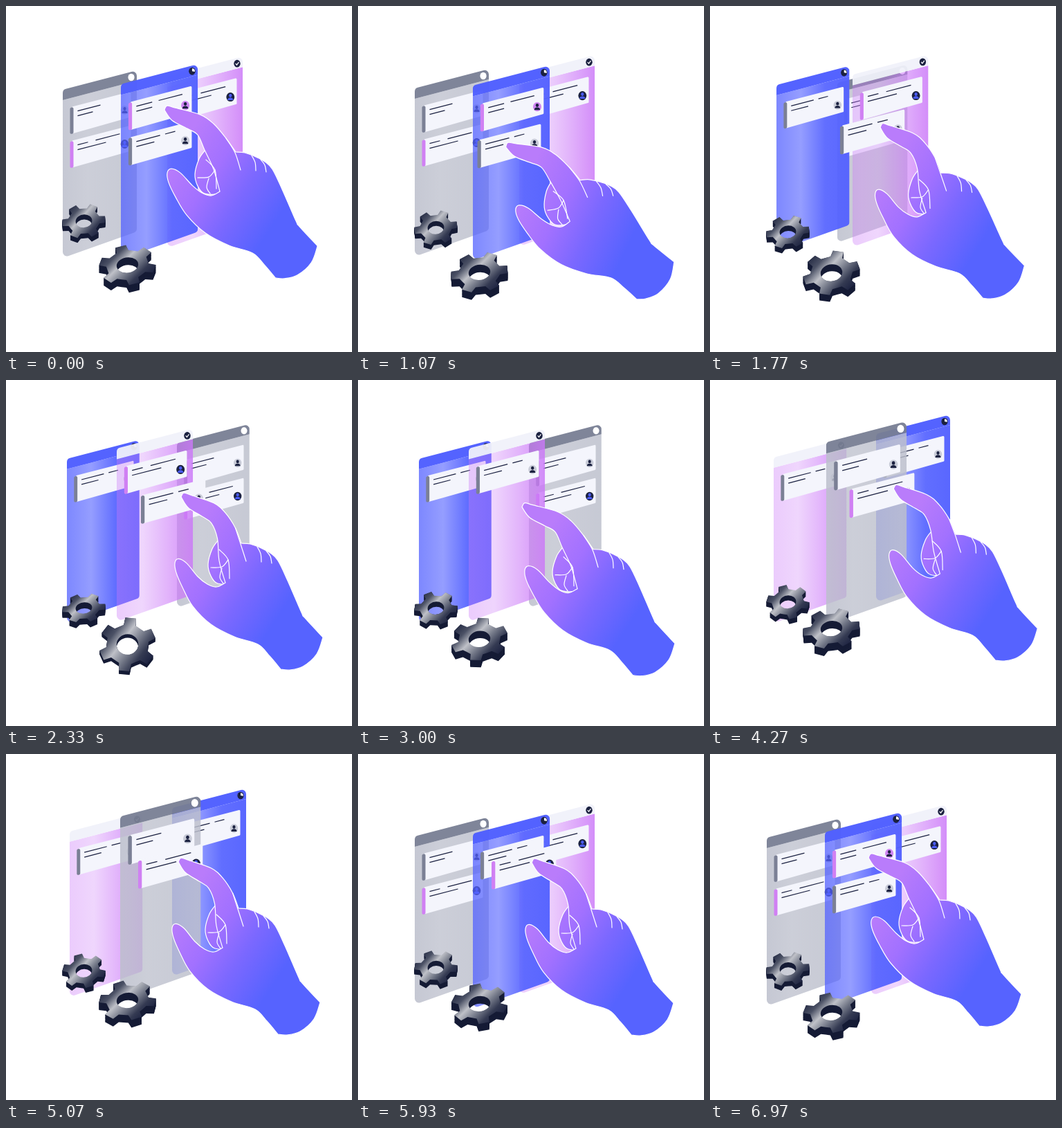
An HTML page with a canvas that plays this animation: 500 by 500 pixels, repeating every 7.01 s.

```html
<!DOCTYPE html>
<html lang="en">
<head>
<meta charset="utf-8">
<title>Task boards</title>
<style>
  html, body { margin: 0; width: 100%; height: 100%; overflow: hidden; background: #fff; }
  canvas { display: block; width: 500px; height: 500px; }
</style>
</head>
<body>
<canvas id="stage"></canvas>
<script>
const LOOP = 7010, SLOPE = -0.26, TAU = Math.PI * 2;
const NAVY = '#1b2140', GRAY = '#7b8095', PINK = '#d080f3';
const canvas = document.getElementById('stage');
const ctx = canvas.getContext('2d');
const ratio = Math.max(1, window.devicePixelRatio || 1);
canvas.width = canvas.height = 500 * ratio;

// Timing helpers
const ease = (t, from, to) => {
  const u = Math.min(1, Math.max(0, (t - from) / (to - from)));
  return u * u * (3 - 2 * u);
};
const mix = (a, b, u) => a.map((v, i) => v + (b[i] - v) * u);
const wave = (t, peak) => Math.cos((t - peak) / LOOP * TAU);
const bump = (t, peak, width) => Math.exp(-(((t - peak) / width) ** 2));

// Drawing helpers
function place(x, y, s, draw) {
  ctx.save();
  ctx.translate(x, y);
  ctx.scale(s, s);
  draw();
  ctx.restore();
}

function roundPoly(pts, r) {
  const n = pts.length, a = pts[n - 1], b = pts[0];
  ctx.beginPath();
  ctx.moveTo((a[0] + b[0]) / 2, (a[1] + b[1]) / 2);
  pts.forEach((p, i) => ctx.arcTo(...p, ...pts[(i + 1) % n], r));
  ctx.closePath();
}

function fillPoly(pts, r, color) {
  roundPoly(pts, r);
  ctx.fillStyle = color;
  ctx.fill();
}

function disc(x, y, rx, ry, color, from = 0, to = TAU) {
  ctx.beginPath();
  ctx.ellipse(x, y, rx, ry, 0, from, to);
  ctx.fillStyle = color;
  ctx.fill();
}

function line(pts, color, width) {
  ctx.beginPath();
  pts.forEach(p => ctx.lineTo(...p));
  ctx.strokeStyle = color;
  ctx.lineWidth = width;
  ctx.stroke();
}

function gradient(box, stops) {
  const g = ctx.createLinearGradient(...box);
  stops.forEach(stop => g.addColorStop(...stop));
  return g;
}

// Smooth curve through the points, continuing the current path.
function trace(pts) {
  ctx.lineTo(...pts[0]);
  for (let i = 0; i < pts.length - 1; i++) {
    const a = pts[i - 1] || pts[i], b = pts[i], c = pts[i + 1], d = pts[i + 2] || c;
    ctx.bezierCurveTo(b[0] + (c[0] - a[0]) / 6, b[1] + (c[1] - a[1]) / 6,
      c[0] - (d[0] - b[0]) / 6, c[1] - (d[1] - b[1]) / 6, ...c);
  }
}

// Boards: each arrangement lists left, center and right as x, y, scale.
const names = ['gray', 'blue', 'pink'];
const arrangements = [
  [[82, 119, 1], [166, 115, 1.04], [233, 99.5, 1.02]],
  [[88, 114, .98], [160, 99, 1.03], [247, 91, .98]],
  [[92, 112, .985], [166, 90, 1.09], [240, 78, 1]]
];
const shifts = [{ start: 1050, pace: 1 }, { start: 3100, pace: 1 }, { start: 5030, pace: .7 }];
const delays = [200, 0, 350];

function boardAt(name, t) {
  const index = names.indexOf(name);
  let pos = arrangements[0][index];
  shifts.forEach(({ start, pace }, k) => {
    const spot = (index - k + 3) % 3, from = start + delays[spot] * pace;
    const u = ease(t, from, from + 900 * pace);
    pos = mix(pos, arrangements[(k + 1) % 3][(spot + 2) % 3], u);
    // The board that passes behind the others sinks back on its way.
    const sink = spot === 0 ? Math.sin(Math.PI * u) : 0;
    pos = mix(pos, [pos[0], pos[1] + 10, pos[2] - .04], sink);
  });
  const bob = 2 * bump(Math.min(t, LOOP - t), 0, 500);
  return [pos[0], pos[1] + (index === 1 ? -bob : bob), pos[2]];
}

function stackAt(t) {
  const passed = shifts.filter(s => t > s.start + 500 * s.pace).length % 3;
  return [2, 0, 1].map(i => names[(i + passed) % 3]);
}

// Cards: each mark is start, end, depth
const cards = {
  plain: { tag: GRAY, face: ['#c9ccd8', NAVY], marks: [[11, 44, 8], [11, 33, 15]] },
  note: { tag: GRAY, face: ['#c9ccd8', NAVY], marks: [[11, 44, 8], [51, 65, 8], [11, 36, 15]] },
  task: { tag: PINK, face: [NAVY, '#4b5cf5'], marks: [[11, 26, 8], [37, 72, 8], [11, 52, 15]] },
  hot: { tag: PINK, face: ['#cf86f2', NAVY], marks: [[11, 33, 8], [42, 75, 8], [11, 33, 15]] }
};

function drawCard(kind, x, y, s) {
  const { tag, face, marks } = cards[kind];
  place(x, y, s, () => {
    fillPoly([[3, -1], [88, -23], [88, 14], [3, 38]], 1.5, '#f4f5fc');
    fillPoly([[0, 1], [5, -1], [5, 37.5], [0, 39]], 2, tag);
    for (const [a, b, d] of marks)
      line([[a, d + a * SLOPE], [b, d + b * SLOPE]], NAVY, 1.2);
    disc(79, 4, 5.8, 6.4, face[0]);
    disc(79, 2, 2.1, 2.4, face[1]);
    disc(79, 8.4, 4, 3.6, face[1], Math.PI, TAU);
  });
}

const slotXY = slot => [10.5, 25.5 + 49 * slot];
function slotAt(name, slot, t) {
  const [x, y, s] = boardAt(name, t), [dx, dy] = slotXY(slot);
  return [x + dx * s, y + dy * s, s];
}

// Carried cards travel from a slot to the fingertip and on to another slot.
const carries = [
  { kind: () => 'note', from: ['blue', 1], to: ['pink', 0], grab: [900, 1500], drop: [2400, 2800] },
  { kind: t => t < 6500 ? 'task' : 'hot', from: ['gray', 1], to: ['blue', 0], grab: [3950, 4400], drop: [6050, 6970] }
];
const [noteCarry, taskCarry] = carries;
const hold = ({ grab, drop }, t) => ease(t, ...grab) * (1 - ease(t, ...drop));

function drawCarry(carry, t) {
  const { kind, from, to, grab, drop } = carry;
  if (t < grab[0] || t > drop[1] && carry === noteCarry) return;
  const [x, y] = fingertip(t);
  const lifted = mix(slotAt(...from, t), [x - 59, y, 1.06], ease(t, ...grab));
  drawCard(kind(t), ...mix(lifted, slotAt(...to, t), ease(t, ...drop)));
}

// Cards lying on a board as kind and slot; swaps happen while boards overlap.
function cardsOn(name, t) {
  if (name === 'gray')
    return t > taskCarry.grab[0] && t < 5500 ? [['plain', 0]] : [['plain', 0], ['task', 1]];
  if (name === 'pink')
    return [[t > noteCarry.drop[1] && t < 5350 ? 'note' : 'task', 0]];
  if (t < 1600) return t < noteCarry.grab[0] ? [['hot', 0], ['note', 1]] : [['hot', 0]];
  return [['note', ease(t, 6100, 6750)]];
}

// Body alphas run from left through a light band to the right edge.
const skins = {
  gray: { head: 'rgba(121,127,148,.95)', rgb: '188,191,204', alphas: () => [.86, .76, .8, .84] },
  blue: { head: 'rgba(78,93,255,.96)', rgb: '84,98,255', alphas: () => [.76, .62, .92, .97] },
  pink: { head: 'rgba(241,242,250,.94)', rgb: '203,120,248',
    alphas: t => [.38, .3 + .28 * bump(t, 3600, 350), .56, .84] }
};

const icons = {
  gray() { disc(99, -18, 4.6, 5.2, '#fff'); },
  blue() {
    disc(99, -18, 4.6, 5.2, NAVY);
    ctx.beginPath();
    ctx.moveTo(99, -18);
    ctx.arc(99, -18, 3.8, -Math.PI / 2, .2);
    ctx.fillStyle = '#fff';
    ctx.fill();
  },
  pink() {
    disc(99, -18, 4.6, 5.2, NAVY);
    line([[96.8, -18], [98.5, -16], [101.4, -20]], '#fff', 1.2);
  }
};

function drawBoard(name, t) {
  const { head, rgb, alphas } = skins[name];
  place(...boardAt(name, t), () => {
    const stops = alphas(t).map((a, i) => [i / 3, `rgba(${rgb},${a})`]);
    const band = (top, bottom, color) =>
      fillPoly([[0, top], [107, top - 28], [107, bottom - 28], [0, bottom]], 0, color);
    ctx.save();
    roundPoly([[0, 0], [107, -28], [107, 205], [0, 243]], 6);
    ctx.clip();
    band(15, 290, gradient([0, 0, 107, 0], stops));
    band(-5, 15, head);
    ctx.restore();
    icons[name]();
    for (const [kind, slot] of cardsOn(name, t)) drawCard(kind, ...slotXY(slot), 1);
  });
}

// Gears sway up and down, rock about their axes and tip towards the viewer.
const gears = [
  { x: 112.5, r: 31.5, y: t => 319 + 11 * wave(t, 2700), turn: t => 3 + 11 * wave(t, 4500),
    squash: t => .79 - .12 * bump(t, 2330, 500) },
  { x: 175.5, r: 41.5, y: t => 371 + 15 * wave(t, 1500), turn: t => -3 - 22 * wave(t, 2700),
    squash: t => .7 + .24 * bump(t, 2330, 500) }
];
const METAL = ['#252b44', '#4b5165', '#bfc1c8', '#777c8b', '#343a52', '#1b2140'];

function gearPath(r, turn) {
  const path = new Path2D();
  for (let k = 0; k < 6; k++) {
    const mid = (turn + k * 60) / 360 * TAU;
    for (const [da, q] of [[-.29, .74], [-.19, 1], [.19, 1], [.29, .74], [.52, .72]])
      path.lineTo(r * q * Math.cos(mid + da), r * q * Math.sin(mid + da));
  }
  path.closePath();
  path.moveTo(r * .38, 0);
  path.arc(0, 0, r * .38, 0, TAU);
  return path;
}

function drawGear({ x, r, y, turn, squash }, t) {
  const tip = squash(t), lean = -.14, path = gearPath(r, turn(t));
  const layer = (dy, fill) => place(x, y(t) + dy, 1, () => {
    ctx.rotate(lean);
    ctx.scale(1, tip);
    ctx.rotate(-lean);
    ctx.fillStyle = fill;
    ctx.fill(path, 'evenodd');
  });
  for (let d = r * .37 * Math.sqrt(1 - tip * tip); d > 0; d -= .8) layer(d, '#151b35');
  layer(0, gradient([-r * .85, -r * .6, r * .85, r * .6], METAL.map((c, i) => [i / 5, c])));
}

// Hand: stops of the wrist anchor as time, x, y
const ANCHOR = [339, 237];
const stops = [[0, 339, 237], [900, 331, 277], [2330, 347, 262], [3600, 347, 278],
  [4430, 364, 246], [5070, 343, 249], [5930, 345, 250], [6970, 339, 237]];

function handAt(t) {
  const i = Math.max(1, stops.findIndex(s => s[0] > t));
  const [a, b] = t < 6970 ? [stops[i - 1], stops[i]] : [stops[7], stops[7]];
  const [, x, y] = mix(a, b, ease(t, a[0], b[0] + 1e-6));
  const grip = carries.reduce((sum, c) => sum + hold(c, t), 0);
  return { x, y, turn: -.14 * bump(t, 1050, 500), grip };
}

// Gripping draws the finger and the thumb inwards, most of all at their tips.
function flex([x, y], grip) {
  if (y < 209 && x < 330) {
    const w = grip * Math.sqrt((330 - x) / 100);
    return [x + 16 * w, y - 6 * w];
  }
  if (y > 230 && x < 268) {
    const w = grip * (268 - x) / 34;
    return [x + 3 * w, y - 2 * w];
  }
  return [x, y];
}

function fingertip(t) {
  const { x, y, turn, grip } = handAt(t);
  const [px, py] = flex([230, 148], grip);
  const dx = px - ANCHOR[0], dy = py - ANCHOR[1], c = Math.cos(turn), s = Math.sin(turn);
  return [x + dx * c - dy * s, y + dx * s + dy * c];
}

const outline = [
  [[229, 150], [233, 144], [245, 147], [281, 157], [300, 170], [318, 191], [332, 211]],
  [[332, 211], [345, 212], [361, 218], [374, 225], [385, 236], [399, 265], [419, 311], [424, 319], [450, 347]],
  [[450, 347], [441, 371], [421, 389], [402, 394], [389, 393]],
  [[389, 393], [373, 374], [356, 357], [322, 346], [288, 328], [261, 302], [245, 276], [235, 255], [233, 241],
    [239, 235], [252, 241], [269, 259], [283, 270], [296, 274], [309, 268]],
  [[309, 268], [300, 236], [287, 208], [277, 186], [262, 177], [240, 165], [229, 150]]
];
const curled = [[288, 208], [279, 221], [273, 243], [277, 260], [287, 271], [309, 268], [304, 236], [288, 208]];
const knuckles = [
  [[318, 191], [331, 212], [339, 237]],
  [[355, 216], [360, 226], [361, 238]],
  [[368, 222], [374, 230], [376, 240]]
];
const folds = [
  [[289, 222], [302, 237], [304, 264]],
  [[277, 248], [293, 247], [302, 237]],
  [[293, 249], [290, 262], [295, 271]]
];

function drawHand(t) {
  const { x, y, turn, grip } = handAt(t);
  const flexed = pts => pts.map(p => flex(p, grip));
  const tucked = pts => pts.map(([px, py]) => [px + 11 * grip, py - 2 * grip]);
  const shape = parts => {
    ctx.beginPath();
    parts.forEach(trace);
    ctx.closePath();
    ctx.fill();
    ctx.stroke();
  };
  ctx.save();
  ctx.translate(x, y);
  ctx.rotate(turn);
  ctx.translate(-ANCHOR[0], -ANCHOR[1]);
  ctx.lineCap = ctx.lineJoin = 'round';
  ctx.fillStyle = gradient([245, 215, 390, 310],
    [[0, '#b97cfb'], [.35, '#a271ff'], [.65, '#7b68ff'], [1, '#5663ff']]);
  ctx.strokeStyle = '#fff';
  ctx.lineWidth = 1.2;
  shape([tucked(curled)]);
  shape(outline.map(flexed));
  for (const pts of [...knuckles.map(flexed), ...folds.map(tucked)]) {
    ctx.beginPath();
    trace(pts);
    ctx.stroke();
  }
  ctx.restore();
}

function frame() {
  const t = performance.now() % LOOP;
  ctx.setTransform(ratio, 0, 0, ratio, 0, 0);
  ctx.fillStyle = '#fff';
  ctx.fillRect(0, 0, 500, 500);
  stackAt(t).forEach(name => drawBoard(name, t));
  carries.forEach(carry => drawCarry(carry, t));
  gears.forEach(gear => drawGear(gear, t));
  drawHand(t);
  requestAnimationFrame(frame);
}
frame();
</script>
</body>
</html>
```
